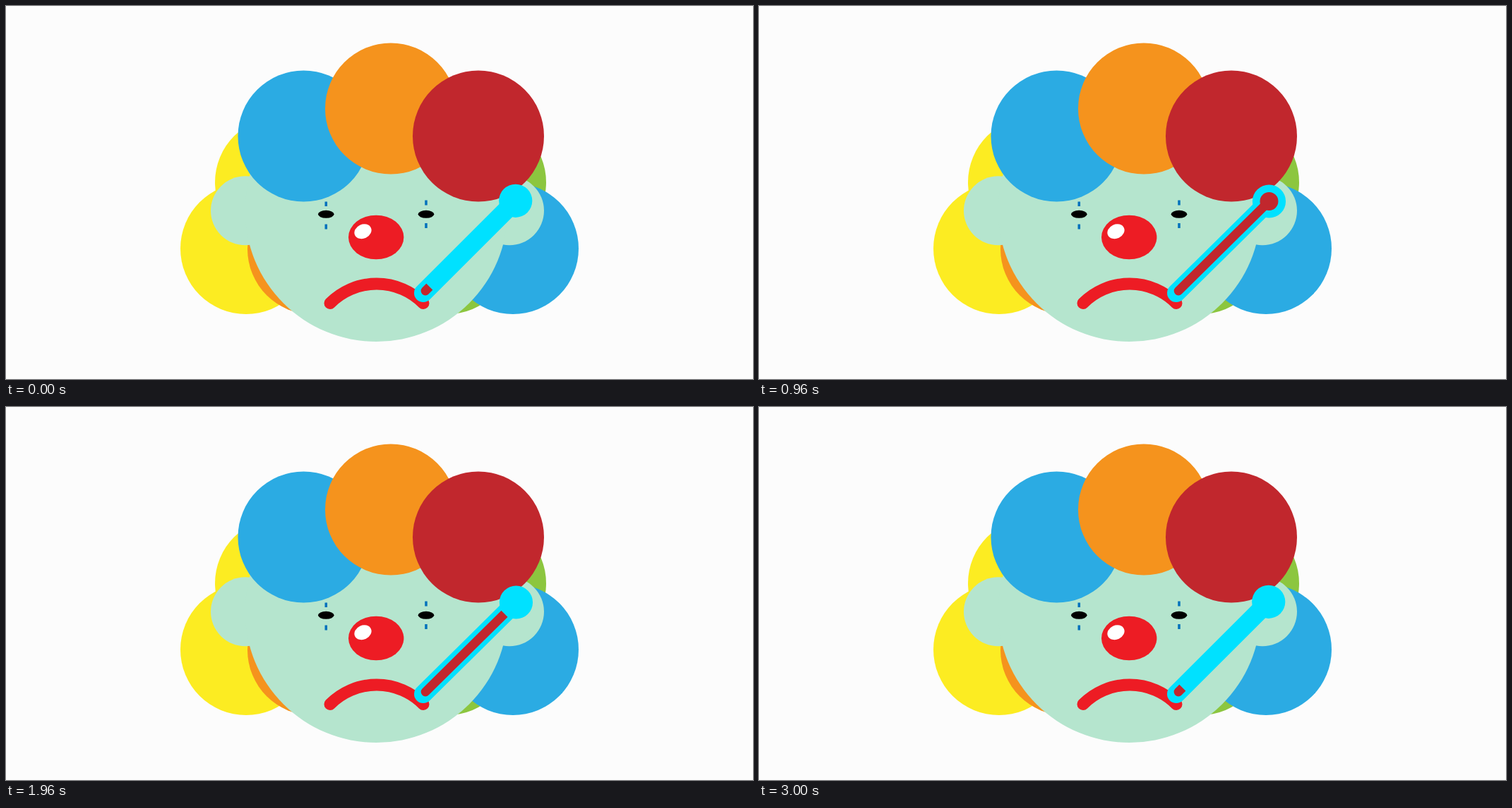
An HTML page for the animation above (3.04 s loop, 1058 by 529 pixels).

```html
<!DOCTYPE html>
<html lang="en">
<head>
<meta charset="utf-8">
<title>Sick clown</title>
<style>
  html, body { margin: 0; width: 100%; height: 100%; overflow: hidden; background: #fcfcfc; }
  svg { display: block; width: 100%; height: 100%; }
</style>
</head>
<body>
<svg viewBox="0 0 1058 529">
  <defs>
    <circle id="puff" r="93"/>
    <clipPath id="level"><rect id="levelBox" y="-20" height="40"/></clipPath>
  </defs>

  <!-- back hair -->
  <use href="#puff" x="389" y="250" fill="#fcec22"/>
  <use href="#puff" x="340" y="344" fill="#fcec22"/>
  <use href="#puff" x="435" y="344.5" fill="#f5931d"/>
  <use href="#puff" x="672" y="250" fill="#8cc63f"/>
  <use href="#puff" x="625" y="344" fill="#8cc63f"/>
  <use href="#puff" x="718" y="344" fill="#2babe3"/>

  <g fill="#b5e5ce">
    <circle cx="339" cy="290.3" r="49"/>
    <circle cx="713" cy="290.3" r="49"/>
    <circle cx="524.5" cy="290" r="186"/>
  </g>

  <!-- front hair -->
  <use href="#puff" x="421.5" y="184.5" fill="#2babe3"/>
  <use href="#puff" x="545" y="145.5" fill="#f5931d"/>
  <use href="#puff" x="669" y="184.5" fill="#c1272d"/>

  <!-- face -->
  <ellipse cx="453.3" cy="295.3" rx="11.3" ry="5.5"/>
  <ellipse cx="595" cy="295.3" rx="11.3" ry="5.5"/>
  <path d="M453.3 277.5v6.5m0 25.5v7M595 275.5v7m0 25.5v7" stroke="#0071bc" stroke-width="3.5"/>
  <ellipse cx="524.2" cy="328" rx="39.2" ry="31.3" fill="#ed1c24"/>
  <ellipse cx="505.5" cy="319.7" rx="12.5" ry="10" transform="rotate(-25 505.5 319.7)" fill="#fff"/>
  <path d="M459 421.5A93 93 0 0 1 591 421.5" fill="none" stroke="#ed1c24" stroke-width="17" stroke-linecap="round"/>

  <!-- thermometer, drawn along the x axis from its pivot -->
  <g id="thermometer" stroke-linecap="round">
    <path d="M12.7 0H197.6" stroke="#00e1ff" stroke-width="26"/>
    <circle cx="197.6" r="23.6" fill="#00e1ff"/>
    <g clip-path="url(#level)">
      <path d="M17 0H197.6" stroke="#c1272d" stroke-width="12.8"/>
      <circle cx="197.6" r="13" fill="#c1272d"/>
    </g>
  </g>
</svg>
<script>
  const LOOP = 3040, ACTIVE = 3000, STEP = 40;
  const thermometer = document.getElementById("thermometer");
  const levelBox = document.getElementById("levelBox");

  const clamp = (v, lo, hi) => Math.min(hi, Math.max(lo, v));
  const ease = (t, from, to) => (1 - Math.cos(Math.PI * clamp((t - from) / (to - from), 0, 1))) / 2;

  function draw(now) {
    const frameTime = Math.floor((now % LOOP) / STEP) * STEP;
    const t = clamp(frameTime - 5, 0, ACTIVE);
    const swing = frameTime >= ACTIVE ? 0 : (1 - Math.cos(2 * Math.PI * t / 1000)) / 2;
    const fill = ease(t, 0, 500) - ease(t, 1500, ACTIVE);
    thermometer.setAttribute("transform", `translate(582 416) rotate(${-45 + 15 * swing})`);
    levelBox.setAttribute("width", 25.2 + 189 * fill);
    requestAnimationFrame(draw);
  }
  requestAnimationFrame(draw);
</script>
</body>
</html>
```
